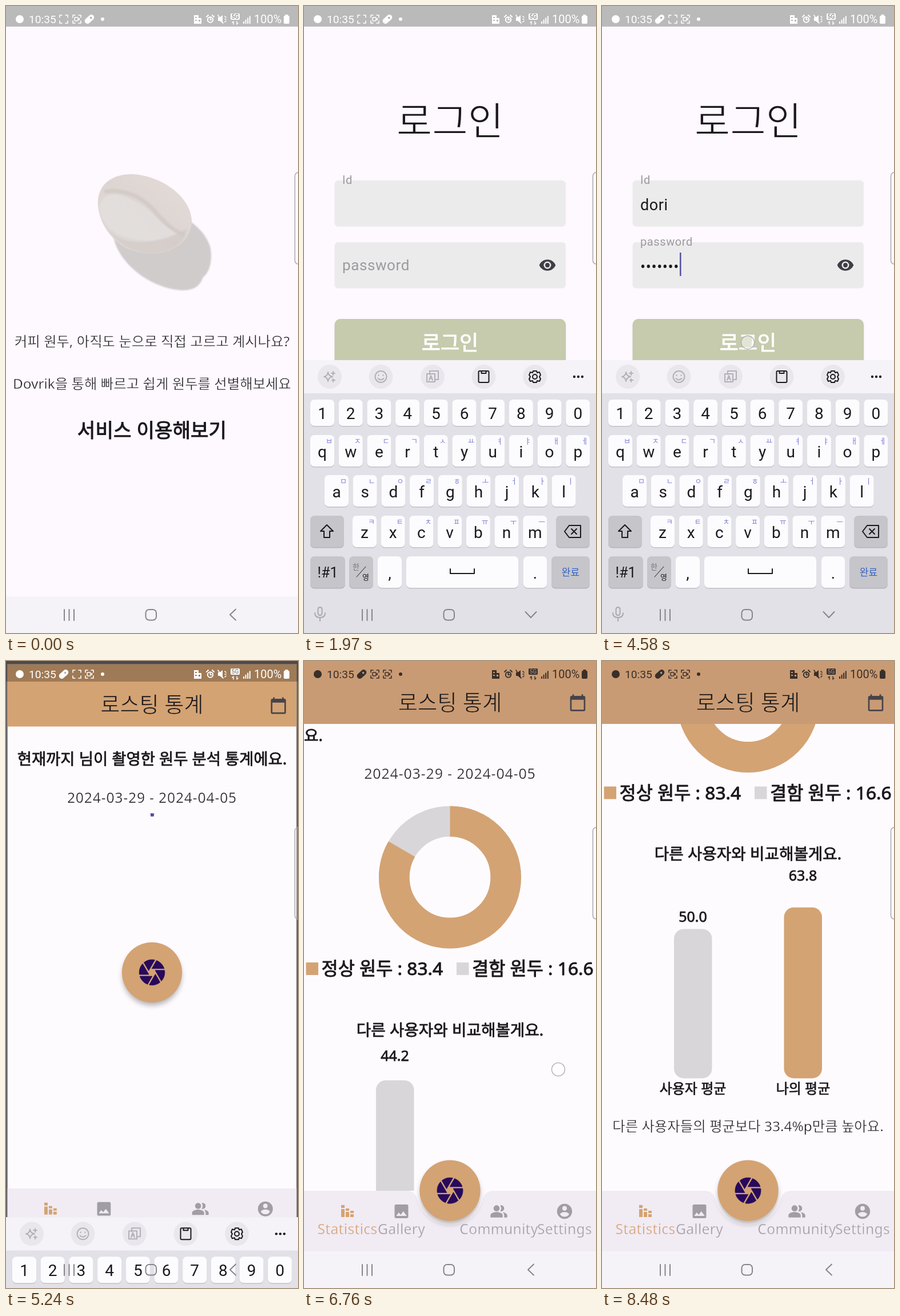
These frames come from a looping animation (511x1096 px, 8510 ms). An HTML page:

```html
<!DOCTYPE html>
<html lang="ko">
<head>
<meta charset="utf-8">
<style>
html, body { margin: 0; width: 100%; height: 100%; overflow: hidden; background: #fef8ff; }
svg { display: block; width: 511px; height: 1096px; color: #1b191d; --bg: #fef9ff; }
text { font-family: 'Noto Sans', 'Noto Sans CJK KR', sans-serif; fill: currentColor; white-space: pre; }
.m { text-anchor: middle; }
/* thin and semi-bold cuts made from the regular weight */
.l { stroke: var(--bg); stroke-width: .02em; }
.s, .b { stroke: currentColor; stroke-width: .03em; stroke-linejoin: round; }
.r { font-family: Roboto, 'Noto Sans CJK KR', sans-serif; }
.f { letter-spacing: .6px; }
.line { fill: none; stroke: currentColor; stroke-width: 2; stroke-linecap: round; stroke-linejoin: round; }
</style>
</head>
<body>
<svg id="stage" viewBox="0 0 511 1096"></svg>
<script>
const LOOP = 8510, KB_H = 477;
const TAN = '#d4a373', GREY = '#d8d6d9', INK = '#1b191d', PAGE = '#fef8ff', DOCK = '#f1ebf4';
const USER = 'dori', PASS = 'bean135';

const clamp = v => Math.max(0, Math.min(1, v));
const ramp = (t, from, dur) => clamp((t - from) / dur);
const smooth = p => p * p * (3 - 2 * p);
const mix = (a, b, p) => a + (b - a) * p;

const txt = (x, y, s, size, cls = '', extra = '') =>
  `<text x="${x}" y="${y + size * .36}" font-size="${size}" class="${cls}" ${extra}>${s}</text>`;
const box = (x, y, w, h, fill, r = 0, extra = '') =>
  `<rect x="${x}" y="${y}" width="${w}" height="${h}" rx="${r}" fill="${fill}" ${extra}/>`;
const disc = (x, y, r, fill, extra = '') =>
  `<circle cx="${x}" cy="${y}" r="${r}" fill="${fill}" ${extra}/>`;
const line = (d, extra = '') => `<path class="line" d="${d}" ${extra}/>`;
const group = (id, body, extra = '') => `<g id="${id}" ${extra}>${body}</g>`;
const at = (x, y, body, scale = 1, extra = '') =>
  `<g transform="translate(${x} ${y}) scale(${scale})" ${extra}>${body}</g>`;
// 24-unit icon centred on a point
const icon = (x, y, scale, fill, d) =>
  at(x, y, `<path transform="translate(-12 -12)" fill="${fill}" fill-rule="evenodd" d="${d}"/>`, scale);

// ---------- splash ----------
const bean = `
  <path d="M188 402C194 446 250 494 308 497C334 497 340 486 345 474C358 464 362 440 357 420C350 400 338 388 322 376Z" fill="#d0cccc" filter="url(#soft)"/>
  <path d="M161 350C158 312 186 293 222 294C272 297 322 332 325 374C326 402 304 428 264 433C232 434 206 426 188 406C172 390 163 370 161 350Z" fill="url(#beanFill)"/>
  <path d="M163 352C172 322 196 326 222 340C254 352 262 378 300 398C280 414 236 414 204 402C180 392 166 376 163 352Z" fill="#e4e0df" opacity=".8" filter="url(#soft)"/>
  <path d="M172 325C196 318 232 330 252 350C270 368 282 388 312 400" fill="none" stroke="#cfc7c2" stroke-width="7" opacity=".7" filter="url(#soft)"/>
  <path d="M180 392C206 420 262 420 318 388C312 416 290 430 262 433C226 434 198 420 180 392Z" fill="#d0c9c5" opacity=".6" filter="url(#soft)"/>`;

const splash = box(0, 0, 511, 1096, PAGE) + bean +
  txt(255.5, 586, '커피 원두, 아직도 눈으로 직접 고르고 계시나요?', 24.4, 'l m') +
  txt(255.5, 660, 'Dovrik을 통해 빠르고 쉽게 원두를 선별해보세요', 24.4, 'l m') +
  txt(255.5, 742, '서비스 이용해보기', 34.3, 'b m');

// ---------- login ----------
const EYE = 'M12 4.5C7 4.5 2.73 7.61 1 12c1.73 4.39 6 7.5 11 7.5s9.27-3.11 11-7.5c-1.73-4.39-6-7.5-11-7.5zM12 17a5 5 0 1 1 0-10 5 5 0 0 1 0 10zm0-8a3 3 0 1 0 0 6 3 3 0 0 0 0-6z';
const button = (y, fill, s) =>
  box(54, y + 2, 404, 80, '#000', 10, 'opacity=".16" filter="url(#soft)"') +
  box(53.5, y, 404.5, 80.5, fill, 10) +
  txt(255.5, y + 42, s, 36, 'b m', 'color="#fff"');
const field = (y, id, label) =>
  box(53.5, y, 404.5, 80.5, '#ebebec', 6) +
  `<text id="${id}Label" x="67" class="r f" color="#9d9a9f">${label}</text>` +
  txt(67, y + 42, '', 27, 'r f', `id="${id}Text"`);

const login = box(0, 0, 511, 1096, PAGE) + txt(255.5, 202, '로그인', 68, 'l m') +
  field(305, 'id', 'Id') + field(413, 'pw', 'password') +
  icon(426, 453, 1.3, '#403d46', EYE) +
  box(67, 323, 2.6, 41, '#5c55a3', 0, 'id="caret"') +
  button(547, '#c5cbac', '로그인') + button(654, '#dee2c5', '회원가입');

// ---------- statistics ----------
const CAL = 'M20 3h-1V1h-2v2H7V1H5v2H4a2 2 0 0 0-2 2v16a2 2 0 0 0 2 2h16a2 2 0 0 0 2-2V5a2 2 0 0 0-2-2zm0 18H4V8h16z';
const IMAGE = 'M21 19V5a2 2 0 0 0-2-2H5a2 2 0 0 0-2 2v14a2 2 0 0 0 2 2h14a2 2 0 0 0 2-2zM8.5 13.5l2.5 3L14.5 12l4.5 6H5z';
const PEOPLE = 'M9 4a4 4 0 1 0 0 8a4 4 0 1 0 0-8zM9 13c-2.700 0-8 1.300-8 4v3h16v-3c0-2.700-5.300-4-8-4zM16.700 13.100C18 14 19 15.300 19 17v3h4v-3c0-2.200-3.600-3.500-6.300-3.900zM15 12a4 4 0 0 0 0-8l-1.300.240a6 6 0 0 1 0 7.520z';
const PERSON = 'M12 2a10 10 0 1 0 0 20 10 10 0 0 0 0-20zm0 3a3 3 0 1 1 0 6 3 3 0 0 1 0-6zm0 14.2a7.2 7.2 0 0 1-6-3.2c0-2 4-3.1 6-3.1s6 1.1 6 3.1a7.2 7.2 0 0 1-6 3.2z';
const blades = [0, 1, 2, 3, 4, 5].map(i =>
  `<path transform="rotate(${i * 60}) translate(-12 -12)" d="M21.54 9c-.92-2.92-3.15-5.26-6-6.34L11.88 9z"/>`).join('');
const date = y => txt(255.5, y, '2024-03-29 - 2024-04-05', 25, 'l m', 'letter-spacing=".8"');
const bar = (id, x, fill) =>
  box(x, 0, 66.5, 0, fill, 0, `id="${id}Bar"`) + txt(x + 33, 0, '', 25, 's m', `id="${id}Val"`);
const legend = (x, fill, s) => box(x, 528, 21.5, 22, fill) + txt(x + 27, 539, s, 31.7, 's');
const ring = (stroke, extra) =>
  `<circle cx="255.5" cy="379" r="97.7" fill="none" stroke="${stroke}" stroke-width="53.6" ${extra}/>`;

const waiting = txt(255.5, 167, '현재까지 님이 촬영한 원두 분석 통계에요.', 27.7, 'b m') + date(236) +
  '<circle id="spin" cx="255.5" cy="293" r="27" fill="none" stroke="#4f4aa8" stroke-width="5.5" pathLength="100"/>';
const stats =
  txt(0, 89, `현재까지 ${USER}님이 촬영한 원두 분석 통계에`, 27.7, 'b') + txt(0, 131, '요.', 27.7, 'b') + date(198) +
  ring(GREY, '') + ring(TAN, 'pathLength="100" stroke-dasharray="83.4 100" transform="rotate(-90 255.5 379)"') +
  legend(3.5, TAN, '정상 원두 : 83.4') + legend(267, GREY, '결함 원두 : 16.6') +
  txt(255.5, 646, '다른 사용자와 비교해볼게요.', 27.7, 'b m') +
  bar('avg', 126, GREY) + bar('mine', 318.5, TAN) +
  txt(159, 1056, '사용자 평균', 24, 'b m') + txt(352, 1056, '나의 평균', 24, 'b m') +
  txt(255.5, 1122, '다른 사용자들의 평균보다 33.4%p만큼 높아요.', 24.4, 'l m');

const tab = (x, s, color) => txt(x, 993, s, 24.6, 'l m', `letter-spacing=".3" color="${color}"`);
const TAB = '#a19da4';
const tabs = [[65, 951, 5], [65, 958, 14], [73, 957, 4], [73, 963, 9], [81, 961, 4], [81, 967, 5]]
    .map(([x, y, h]) => box(x, y, 6, h, TAN)).join('') +
  icon(170.5, 962, 1.33, TAB, IMAGE) + icon(341, 962, 1.33, TAB, PEOPLE) + icon(456, 962, 1.32, TAB, PERSON) +
  tab(76, 'Statistics', TAN) + tab(170.5, 'Gallery', TAB) + tab(341, 'Community', TAB) + tab(456, 'Settings', TAB);

const home = box(0, 0, 511, 1096, '#fefbff') +
  `<g clip-path="url(#body)">${group('waiting', waiting)}${group('stats', stats)}</g>` +
  box(0, 0, 511, 110, TAN, 0, 'id="head"') +
  txt(255.5, 72, '로스팅 통계', 37.5, 'l m', `style="--bg:${TAN}"`) +
  icon(479, 73, 1.33, '#47434b', CAL) +
  `<path id="dock" fill="${DOCK}"/><g style="--bg:${DOCK}">${tabs}</g>` +
  group('fab', disc(0, 6, 52, '#000', 'opacity=".3" filter="url(#blur)"') + disc(0, 0, 53.2, TAN) +
    `<g transform="scale(2.25)" fill="#270a5c" stroke="#270a5c" stroke-width=".35">${blades}</g>`);

// ---------- keyboard ----------
const keys = {};
const key = (x, y, w, h, s, hint) => {
  keys[s] = [x + w / 2, y + h / 2];
  return box(x, y + 1.5, w, h, '#c3c2c8', 7) + box(x, y, w, h, '#fcfbfe', 7) +
    txt(x + w / 2, y + h / 2 + 1, s, 28, 'r m') +
    (hint ? txt(x + w - 9, y + 10, hint, 13, 'm', 'color="#7b80d6"') : '');
};
const row = (x, y, h, chars, hints = '') =>
  [...chars].map((c, i) => key(x + i * 49.7, y, 42, h, c, hints[i])).join('');
const gray = (x, y, w) => box(x, y + 1.5, w, 55, '#b4b3b9', 7) + box(x, y, w, 55, '#c6c5ca', 7);
const tool = (x, d, color, id = '') =>
  disc(x, 648, 21, '#e9e7ec') + at(x, 648, line(d), 1, `color="${color}"` + (id && ` id="${id}"`));

const SPARK = 'M-3-8Q-2-1 5 0Q-2 1-3 8Q-4 1-10 0Q-4-1-3-8ZM6-9v6M3-6h6M6 4v5M4 6h5';
const SMILE = 'M-10 0a10 10 0 1 0 20 0a10 10 0 1 0-20 0M-4-3v1M4-3v1M-5 3Q0 8 5 3';
const SWAP = 'M-5-4V-10H10V5H5M-10-5H4V9H-10ZM-6 6L-3-2L0 6M-5 3H-1';
const CLIP = 'M-9-8q0-2 2-2H7q2 0 2 2V8q0 2-2 2H-7q-2 0-2-2ZM-4-10v4H4v-4';
const GEAR = 'M-3-10H3L4-7L8-8L10-3L8 0L10 4L8 8L4 7L3 10H-3L-4 7L-8 8L-10 4L-8 0L-10-3L-8-8L-4-7ZM-4 0a4 4 0 1 0 8 0a4 4 0 1 0-8 0';

const keyboard = box(0, 619, 511, 900, '#e2e1e7') + box(0, 619, 511, 58, '#f5f3f8') +
  tool(45, SPARK, '#b3b1b7') + tool(134.5, SMILE, '#b3b1b7') + tool(225, SWAP, INK, 'swap') +
  tool(314.5, CLIP, INK) + tool(404, GEAR, INK) +
  [473, 480, 487].map(x => disc(x, 648, 2.2, INK)).join('') +
  row(11, 688, 46, '1234567890') +
  row(11, 750, 55, 'qwertyuiop', 'ㅂㅈㄷㄱㅅㅛㅕㅑㅐㅔ') +
  row(36, 820, 55, 'asdfghjkl', 'ㅁㄴㅇㄹㅎㅗㅓㅏㅣ') +
  row(85, 891, 55, 'zxcvbnm', 'ㅋㅌㅊㅍㅠㅜㅡ') +
  gray(11, 891, 59) + line('M40 907l-11 11h6v11h10v-11h6z') +
  gray(441, 891, 59) + line('M464 908h20v21h-20l-8-10.500zM468 914l9 9m0-9l-9 9') +
  gray(11, 962, 61) + txt(41.5, 990, '!#1', 25, 'r m') +
  gray(79, 962, 42) + txt(91, 980, '한', 13, 'm', 'color="#77757b"') + txt(108, 998, '영', 13, 'm') +
  line('M92 998l16-18', 'style="stroke-width:1"') +
  key(129, 962, 42, 55, ',') + key(179, 962, 196, 55, ' ') + key(384, 962, 41, 55, '.') +
  line('M256 984v8h42v-8') + gray(433, 962, 67) + txt(466.5, 990, '완료', 17, 'm', 'color="#3563c4"');

// ---------- system bars ----------
const corners = 'M-7-3v-4h4M3-7h4v4M7 3v4h-4M-3 7h-4v-4';
const frame = line(corners, 'style="stroke-width:1.6"');
const cam = frame + '<rect x="-4" y="-3" width="6" height="6" rx="1" fill="none" stroke="currentColor" stroke-width="1.5"/><path d="M2 0l3-2.500v5z" fill="currentColor"/>';
const pill = '<g transform="rotate(-42)"><rect x="-9.500" y="-4.800" width="19" height="9.600" rx="4.800" fill="currentColor"/><circle cx="3.500" r="1.700" fill="#aaa"/></g>';
const status = disc(24, 23, 7, 'currentColor') + txt(40, 23, '10:35', 19.2, 'r') +
  at(0, 23, frame, 1, 'id="blank"') + at(0, 23, cam, 1, 'id="blinkCam"') +
  at(0, 23, cam, 1, 'id="cam"') + at(0, 23, pill, 1, 'id="pill"') + disc(169, 23, 3, 'currentColor') +
  '<path fill="currentColor" fill-rule="evenodd" d="M329 16h8v5h5v10h-13zM331 19v2h3v-2zM331 24v2h3v-2zM337 24v3h3v-3z"/>' +
  disc(357.5, 24, 4.7, 'none', 'class="line"') + line('M351 19l3-3M364 19l-3-3M357.500 21v3h2') +
  '<path fill="currentColor" d="M371 20h3l5-4v14l-5-4h-3z"/>' + line('M371 16l9 14M383 18l2 2M383 23h2M383 28l2-2', 'style="stroke-width:1.6"') +
  box(393, 13, 16, 11, 'currentColor', 2) +
  txt(401, 18.7, '5G', 10, 'r b m', 'color="#888"') +
  line('M398 32v-5l-2 2M404 27v5l2-2', 'style="stroke-width:1.4"') +
  [0, 1, 2, 3].map(i => box(415 + i * 3.6, 27 - i * 3.2, 2, 4 + i * 3.2, 'currentColor')).join('') +
  txt(434, 23, '100%', 20, 'r') + box(486, 17, 10, 14, 'currentColor', 2) + box(488.5, 15, 5, 3, 'currentColor');

const nav = line('M102 1055v19M110.500 1055v19M119 1055v19') +
  '<rect class="line" x="244.500" y="1055" width="18.500" height="18.500" rx="6"/>' +
  group('back', line('M402 1054.500l-10 9.500l10 9.500')) +
  group('mic', line('M24.500 1055q0-4 3.500-4t3.500 4v6q0 4-3.500 4t-3.500-4zM19 1061q0 8 9 8t9-8M28 1069v6'), 'color="#aaa8ae"');

document.getElementById('stage').innerHTML = `<defs>
  <filter id="soft"><feGaussianBlur stdDeviation="1"/></filter>
  <filter id="blur" x="-30%" y="-30%" width="160%" height="160%"><feGaussianBlur stdDeviation="5"/></filter>
  <linearGradient id="beanFill" x1="1" y1="0" x2="0" y2="1"><stop stop-color="#e5dcd9"/><stop offset=".5" stop-color="#ddd5d2"/><stop offset="1" stop-color="#dfdad8"/></linearGradient>
  <clipPath id="body"><rect y="110" width="511" height="816"/></clipPath></defs>` +
  group('splash', splash) + group('login', login) +
  box(0, 0, 511, 1096, '#000', 0, 'id="scrim"') + group('home', home) +
  box(0, 1032, 511, 64, '#f5f3f8') + group('kb', keyboard) +
  group('nav', nav, 'color="#87858b"') +
  box(0, 0, 511, 36, '#000', 0, 'id="shade"') + group('status', status) +
  '<rect x="505.500" y="291" width="14" height="160" rx="6" fill="#fff" fill-opacity=".2" stroke="#aaa7ad" stroke-width="1.500"/>' +
  '<circle id="touch" r="11.500" fill="#fff" fill-opacity=".5" stroke="#aaa" stroke-width="1.300"/>';

// ---------- timeline ----------
const $ = {};
document.querySelectorAll('[id]').forEach(e => $[e.id] = e);
const set = (id, attrs) => { for (const k in attrs) $[id].setAttribute(k, attrs[k]); };
const show = (id, on) => $[id].style.display = on ? '' : 'none';
const zoom = (id, s) => set(id, { transform: `translate(255.5 548) scale(${s}) translate(-255.5 -548)` });

const idAt = i => 2270 + i * 180, pwAt = i => 3560 + i * 95;
const TO_LOGIN = 330, ID_FOCUS = 1320, PW_FOCUS = 3050, TO_HOME = 5020, LOADED = 5900;
const KB_IN = 1351, KB_OUT = 5081, COUNT_RATE = .05375;
const taps = [[60, 130, 255, 742], [1280, 130, 336, 315], [3000, 100, 230, 455], [4470, 130, 255, 588],
  ...[...USER].map((c, i) => [idAt(i), 80, ...keys[c]]),
  ...[...PASS].map((c, i) => [pwAt(i), 60, ...keys[c]])];
const scroll = [[6640, 78], [6700, 45], [6760, 0], [6880, -130], [7000, -230], [7150, -292], [7300, -308.6]];

function along(table, t) {
  if (t <= table[0][0]) return table[0][1];
  for (let i = 1; i < table.length; i++) {
    const [a, va] = table[i - 1], [b, vb] = table[i];
    if (t < b) return mix(va, vb, (t - a) / (b - a));
  }
  return table[table.length - 1][1];
}

function pages(t) {
  const second = t >= TO_HOME;
  const p = ramp(t, second ? TO_HOME : TO_LOGIN, 300), e = 1 - (1 - p) ** 2;
  const [from, to] = second ? ['login', 'home'] : ['splash', 'login'];
  show('splash', !second && p < 1);
  show('login', second ? p < 1 : p > 0);
  show('home', second);
  zoom(from, 1 + .05 * e);
  zoom(to, .85 + .15 * e);
  $[from].style.opacity = 1;
  $[to].style.opacity = clamp(p / .35);
  $[to].before($.scrim);
  $.scrim.style.opacity = p > 0 && p < 1 ? .6 * clamp(p * 2) : 0;
}

function form(t) {
  const float = (id, y0, y1, start) => {
    const p = smooth(ramp(t, start, 130)), size = mix(26, 20, p);
    set(id + 'Label', { 'font-size': size, y: mix(y0, y1, p) + size * .36 });
  };
  float('id', 345, 304, ID_FOCUS);
  float('pw', 453, 412, PW_FOCUS);
  const typed = [...USER].filter((_, i) => t >= idAt(i)).length;
  const dots = [...PASS].filter((_, i) => t >= pwAt(i)).length;
  $.idText.textContent = USER.slice(0, typed);
  $.pwText.textContent = '•'.repeat(dots);
  const inPw = t >= PW_FOCUS, n = inPw ? dots : typed;
  const since = n ? (inPw ? pwAt : idAt)(n - 1) : inPw ? PW_FOCUS : ID_FOCUS;
  const text = inPw ? $.pwText : $.idText;
  show('caret', t >= ID_FOCUS && (t - since) % 1000 < 500);
  set('caret', { x: 67 + (n ? text.getComputedTextLength() + 1 : 0), y: inPw ? 431 : 323 });
}

// Labels follow the count at once; bars and the axis trail behind it.
function chart(t) {
  const avg = Math.min(50, Math.max(0, (t - 5938) * COUNT_RATE));
  const mine = Math.min(83.4, Math.max(0, (t - 7293.5) * COUNT_RATE));
  const lagAvg = avg - 3 * clamp((50 - avg) / 5) * clamp(avg / 30);
  const lagMine = mine - 6.6 * clamp((mine - 5) / 25) * clamp((83.4 - mine) / 8);
  const unit = 304 / Math.max(lagAvg, lagMine * 1.018, .1);
  const put = (id, v, lag) => {
    const h = lag * unit;
    set(id + 'Bar', { y: 1038 - h, height: h, rx: Math.min(17, h / 2) });
    set(id + 'Val', { y: 1038 - v * unit - 12 });
    $[id + 'Val'].textContent = v > 0 ? v.toFixed(1) : '';
  };
  put('avg', avg, lagAvg);
  put('mine', mine, lagMine);
}

function dashboard(t) {
  const loaded = t >= LOADED, dy = along(scroll, t);
  show('waiting', !loaded);
  show('stats', loaded);
  set('stats', { transform: `translate(0 ${dy})` });
  set('head', { fill: dy < 78 ? '#c99b74' : TAN });
  const s = Math.max(0, t - 5240), len = 3.5 + 65 * Math.abs(Math.sin(s / 430));
  set('spin', { 'stroke-dasharray': `${len} 100`, transform: `rotate(${s * .45 - 96} 255.5 293)` });
  const out = ramp(t, 5270, 160), grow = ramp(t, 5430, 180), docked = out === 1;
  set('fab', { transform: `translate(255.5 ${docked ? 925.7 : 544.3}) scale(${docked ? smooth(grow) : 1 - smooth(out)})` });
  set('dock', { d: docked
    ? 'M0 926H180Q194 926 198 940A59 59 0 0 0 313 940Q317 926 331 926H511V1032H0Z'
    : 'M0 926H511V1032H0Z' });
  chart(t);
}

function system(t) {
  const kb = smooth(ramp(t, KB_IN, 300)) - smooth(ramp(t, KB_OUT, 240));
  show('kb', kb > 0);
  set('kb', { transform: `translate(0 ${KB_H * (1 - kb)})` });
  set('swap', { color: t < 1700 ? INK : '#b3b1b7' });
  const turn = smooth(ramp(t, KB_IN, 140)) - smooth(ramp(t, KB_OUT, 140));
  set('back', { transform: `rotate(${-90 * turn} 397 1064)` });
  $.mic.style.opacity = turn;
  const dark = t >= 5330, onHome = t >= TO_HOME;
  set('shade', { fill: onHome ? '#000' : '#bababa', opacity: dark ? 0 : onHome ? .25 : 1 });
  set('status', { color: dark ? '#3a2f29' : '#fff' });
  const early = t < 2100;
  const rec = (t > 3000 && t < 4200) || (t > 6200 && t < 7100) || t > 8200;
  const place = (id, x) => set(id, { transform: `translate(${x} 23)` });
  place('blank', early ? 101 : 124);
  place('blinkCam', early ? 101 : 124);
  place('cam', early ? 124 : 146);
  place('pill', early ? 146 : 101);
  show('blank', !rec);
  show('blinkCam', rec);
}

function touch(t) {
  let spot = null;
  for (const [start, hold, x, y] of taps)
    if (t >= start && t < start + hold + 60) spot = [x, y, 1 - ramp(t, start + hold, 60)];
  if (t >= 6600 && t < 6900) spot = [445, 715 + along(scroll, t), 1 - ramp(t, 6860, 40)];
  show('touch', spot);
  if (spot) set('touch', { cx: spot[0], cy: spot[1], opacity: spot[2] });
}

const began = performance.now();
function draw() {
  const t = (performance.now() - began) % LOOP;
  pages(t);
  form(t);
  dashboard(t);
  system(t);
  touch(t);
  requestAnimationFrame(draw);
}
draw();
</script>
</body>
</html>
```
